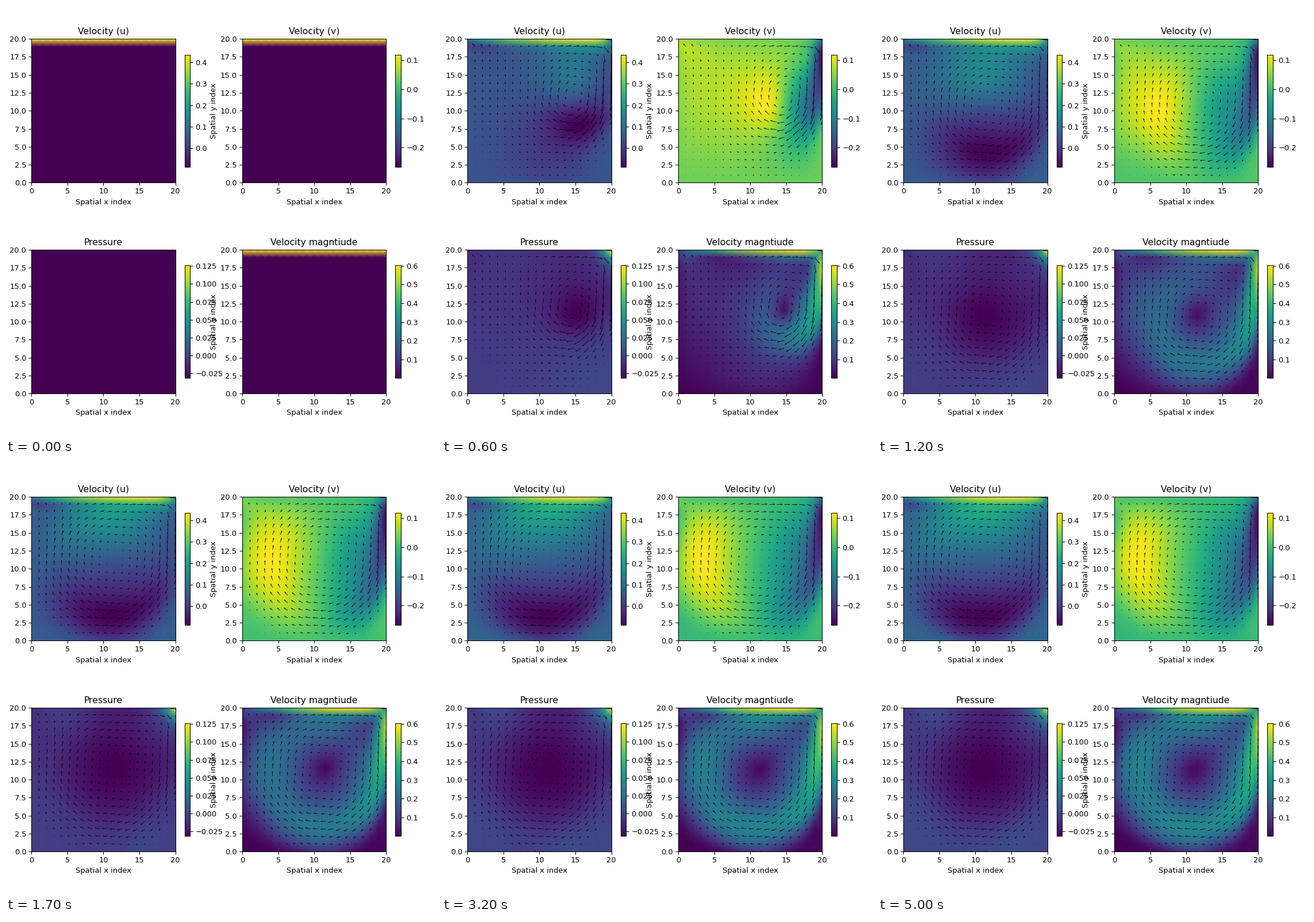
Animation of 748 by 748 pixels, one loop 5100 ms. Source, as a matplotlib script:

```python
import numpy as np
import matplotlib.pyplot as plt
from matplotlib.animation import FuncAnimation
from matplotlib.cm import ScalarMappable
from matplotlib.colors import Normalize

STAGE = 748
FRAMES, INTERVAL = 51, 100

# Lid-driven cavity on a staggered unit grid
N = 20
H = 1 / N
NU = 1 / 1000
DT = 0.01
STEPS_PER_FRAME = 100


def poisson_inverse():
    """Pseudo-inverse of the Laplacian with zero-gradient walls."""
    line = np.diag(np.full(N, -2.0)) + np.eye(N, k=1) + np.eye(N, k=-1)
    line[0, 0] = line[-1, -1] = -1
    eye = np.eye(N)
    return np.linalg.pinv((np.kron(eye, line) + np.kron(line, eye)) / H**2)


def flux(c, low, high):
    """Central transport plus diffusion through a face."""
    return c * (low + high) / 2 + NU * (low - high) / H


def centres(u, v):
    return (u[:, :-1] + u[:, 1:]) / 2, (v[:-1] + v[1:]) / 2


def acceleration(u, v):
    up = np.vstack([-u[:1], u, 2 - u[-1:]])
    vp = np.hstack([-v[:, :1], v, -v[:, -1:]])
    u_corner = (up[:-1] + up[1:]) / 2
    v_corner = (vp[:, :-1] + vp[:, 1:]) / 2
    uc, vc = centres(u, v)
    uu = flux(uc, u[:, :-1], u[:, 1:])
    vv = flux(vc, v[:-1], v[1:])
    vu = flux(v_corner, up[:-1], up[1:])
    uv = flux(u_corner, vp[:, :-1], vp[:, 1:])
    du = -(np.diff(uu, axis=1) + np.diff(vu, axis=0)[:, 1:-1]) / H
    dv = -(np.diff(vv, axis=0) + np.diff(uv, axis=1)[1:-1]) / H
    return du, dv


def simulate():
    """Return (u, v, p) at the cell centres for every frame."""
    inverse = poisson_inverse()
    u, v = np.zeros((N, N + 1)), np.zeros((N + 1, N))
    start = np.zeros((N, N))
    start[-1] = 1
    states = [(start, start, np.zeros((N, N)))]
    old = acceleration(u, v)
    for _ in range(FRAMES - 1):
        for _ in range(STEPS_PER_FRAME):
            new = acceleration(u, v)
            u[:, 1:-1] += DT * (1.5 * new[0] - 0.5 * old[0])
            v[1:-1] += DT * (1.5 * new[1] - 0.5 * old[1])
            old = new
            div = (np.diff(u, axis=1) + np.diff(v, axis=0)) / H
            phi = (inverse @ div.ravel()).reshape(N, N)
            u[:, 1:-1] -= np.diff(phi, axis=1) / H
            v[1:-1] -= np.diff(phi, axis=0) / H
        states.append((*centres(u, v), phi / DT))
    return states


states = simulate()
fig = plt.figure(figsize=(8, 8), dpi=STAGE / 8, facecolor="white")
nodes = np.linspace(0, 20, N)


def place(x, y, w, h):
    """Add axes from a pixel box measured from the top left."""
    return fig.add_axes([x / STAGE, 1 - (y + h) / STAGE, w / STAGE, h / STAGE])


def panel(x, y, title, low, high):
    ax = place(x, y, 250.1, 250.1)
    blank = np.zeros((N, N))
    mesh = ax.pcolormesh(nodes, nodes, blank, shading="gouraud", cmap="viridis")
    arrows = ax.quiver(nodes, nodes, blank, blank, scale=1)
    ax.set(xlim=(0, 20), ylim=(0, 20), title=title, xlabel="Spatial x index")
    if x > STAGE / 2:
        ax.set_ylabel("Spatial y index")
    bar = place(x + 266.2, y + 27.3, 9.9, 195.6)
    fig.colorbar(ScalarMappable(Normalize(low, high), "viridis"), cax=bar)
    return mesh, arrows


LEFT, RIGHT, TOP, BOTTOM = 44.4, 411.1, 57.2, 424.0
panels = [
    panel(LEFT, TOP, "Velocity (u)", -0.0885, 0.437),
    panel(RIGHT, TOP, "Velocity (v)", -0.2667, 0.119),
    panel(LEFT, BOTTOM, "Pressure", -0.0312, 0.1258),
    panel(RIGHT, BOTTOM, "Velocity magntiude", 0.0008, 0.602),
]


def draw(k):
    u, v, p = states[k]
    speed = np.hypot(u, v)
    for (mesh, arrows), field in zip(panels, (u, v, p, speed)):
        mesh.set_array(field)
        mesh.autoscale()
        arrows.scale = 1.8 * N * speed.mean()
        arrows.set_UVC(u, v)
        arrows.set_visible(k > 0)
    return [artist for pair in panels for artist in pair]


anim = FuncAnimation(fig, draw, frames=FRAMES, interval=INTERVAL,
                     init_func=lambda: draw(0), repeat=True, repeat_delay=0)
plt.show()
```
